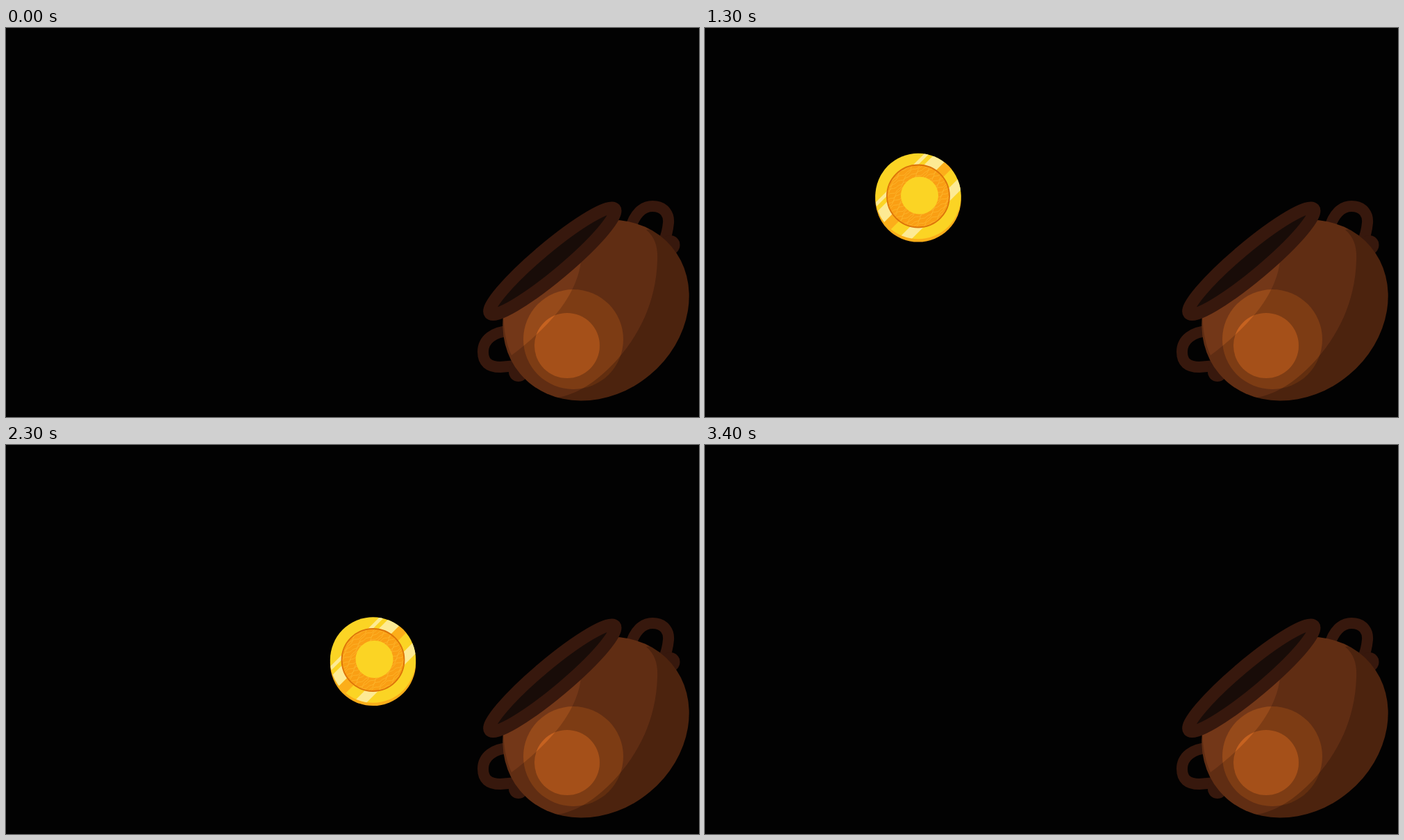
Write an HTML page that moves like this. It is 998 px wide and 561 px high and loops after 8000 ms.

```html
<!DOCTYPE html>
<html lang="en">
<head>
<meta charset="utf-8">
<title>Coin and pot</title>
<style>
  html, body { margin: 0; width: 100%; height: 100%; overflow: hidden; background: #020202; }
  svg { display: block; width: 100vw; height: 100vh; }
  .clay { fill: #37180d; }
  .handle { fill: none; stroke: #37180d; stroke-width: 16; }
  .shine { fill: #2a2f38; mix-blend-mode: color-dodge; }
  .pale { fill: #fdea94; }
  .amber { fill: #fcae1a; }
  .gold { fill: #fbd424; }
</style>
</head>
<body>
<svg viewBox="0 0 998 561" preserveAspectRatio="none">
  <defs>
    <clipPath id="inBody"><ellipse rx="142.5" ry="121.5" transform="translate(849.5 407) rotate(-40)"/></clipPath>
    <clipPath id="inFace"><circle r="61.7"/></clipPath>
    <clipPath id="inDisc"><circle r="45"/></clipPath>
  </defs>

  <g id="coin" visibility="hidden">
    <circle class="amber" cy="2.4" r="61.7"/>
    <g transform="translate(0 -2)">
      <circle class="gold" r="61.7"/>
      <g clip-path="url(#inFace)">
        <g transform="rotate(-45)">
          <rect class="pale" x="-70" y="-37" width="140" height="5"/>
          <rect class="pale" x="-70" y="-26" width="140" height="18"/>
          <rect class="amber" x="-70" y="-8" width="140" height="14"/>
          <rect class="pale" x="-70" y="23" width="140" height="14"/>
        </g>
      </g>
      <circle r="45" fill="#fa9f14"/>
      <g clip-path="url(#inDisc)">
        <path id="grain" transform="rotate(-38)" fill="none" stroke="#fdb930" stroke-width=".9" opacity=".75"/>
      </g>
      <circle r="45" fill="none" stroke="#dd7409" stroke-width="1.8"/>
      <circle class="gold" cx="2" cy="-1" r="27"/>
    </g>
  </g>

  <g id="pot">
    <path class="handle" d="M899 290C905 268 917 257 931 257C949 257 955 270 954 281C953 292 951 300 947 308"/>
    <circle class="clay" cx="956.5" cy="313" r="14"/>
    <path class="handle" d="M724 437C703 438 687 449 687 467C687 482 695 489 712 489L735 487"/>
    <circle class="clay" cx="738" cy="496" r="14"/>
    <g clip-path="url(#inBody)">
      <rect x="690" y="250" width="308" height="300" fill="#602d13"/>
      <circle cx="817" cy="449" r="72" fill="#7d3c14"/>
      <circle cx="808" cy="458" r="47" fill="#a55019"/>
      <path fill="#100400" opacity=".25" d="M922 291C936 303 939 318 938 336C936 395 912 445 874 485C848 512 822 528 795 533V561H998V280Z"/>
      <path class="shine" d="M828 335C826 360 812 388 795 409C778 430 755 452 728 472C720 455 717 435 716 412L760 350Z"/>
    </g>
    <ellipse rx="117.2" ry="19.7" transform="translate(786.8 336.2) rotate(-40)" fill="#180c08" stroke="#37180d" stroke-width="18"/>
  </g>
</svg>
<script>
  const LOOP = 8000, TICK = 100;
  const coin = document.getElementById('coin');

  // Stretches of the bouncing path: start tick, end tick, curve.
  const hops = [
    [0, 8, 'M-72 230C-50 200 -25 190.5 5 190.5C80 190.5 145 360 185.5 450.5'],
    [8, 8.5, 'M185.5 450.5L204 474'],
    [8.5, 13, 'M204 474C228 350 265 244.5 307 244.5'],
    [13, 17, 'M307 244.5C345 244.5 383 350 410 458.5'],
    [17, 17.3, 'M410 458.5L416 472'],
    [17.3, 23, 'M416 472C446 430 500 341 528.5 312'],
    [23, 27, 'M528.5 312C560 282 595 282 623.5 360.5'],
    [27, 27.2, 'M623.5 360.5L626 367'],
    [27.2, 34, 'M626 367C650 325 690 312 730 312C785 312 805 345 820 400']
  ].map(([from, to, d]) => {
    const path = document.createElementNS('http://www.w3.org/2000/svg', 'path');
    path.setAttribute('d', d);
    return { from, to, path, length: path.getTotalLength() };
  });

  function engrave() {
    let d = '';
    for (let y = -46; y <= 46; y += 4) {
      for (let x = -48; x <= 48; x += 3) {
        const wave = 1.6 * Math.sin(x * 0.22 + y * 0.5) + Math.sin(x * 0.5 - y);
        d += (x === -48 ? 'M' : 'L') + x + ' ' + (y + wave).toFixed(1);
      }
    }
    document.getElementById('grain').setAttribute('d', d);
  }

  function draw(now) {
    const tick = Math.floor((now % LOOP) / TICK);
    const hop = hops.find(h => tick >= h.from && tick < h.to);
    coin.setAttribute('visibility', hop && tick > 0 ? 'visible' : 'hidden');
    if (hop) {
      const part = (tick - hop.from) / (hop.to - hop.from);
      const p = hop.path.getPointAtLength(hop.length * part);
      coin.setAttribute('transform', `translate(${p.x} ${p.y})`);
    }
  }

  engrave();
  const start = performance.now();
  function loop() {
    draw(performance.now() - start);
    requestAnimationFrame(loop);
  }
  loop();
</script>
</body>
</html>
```
